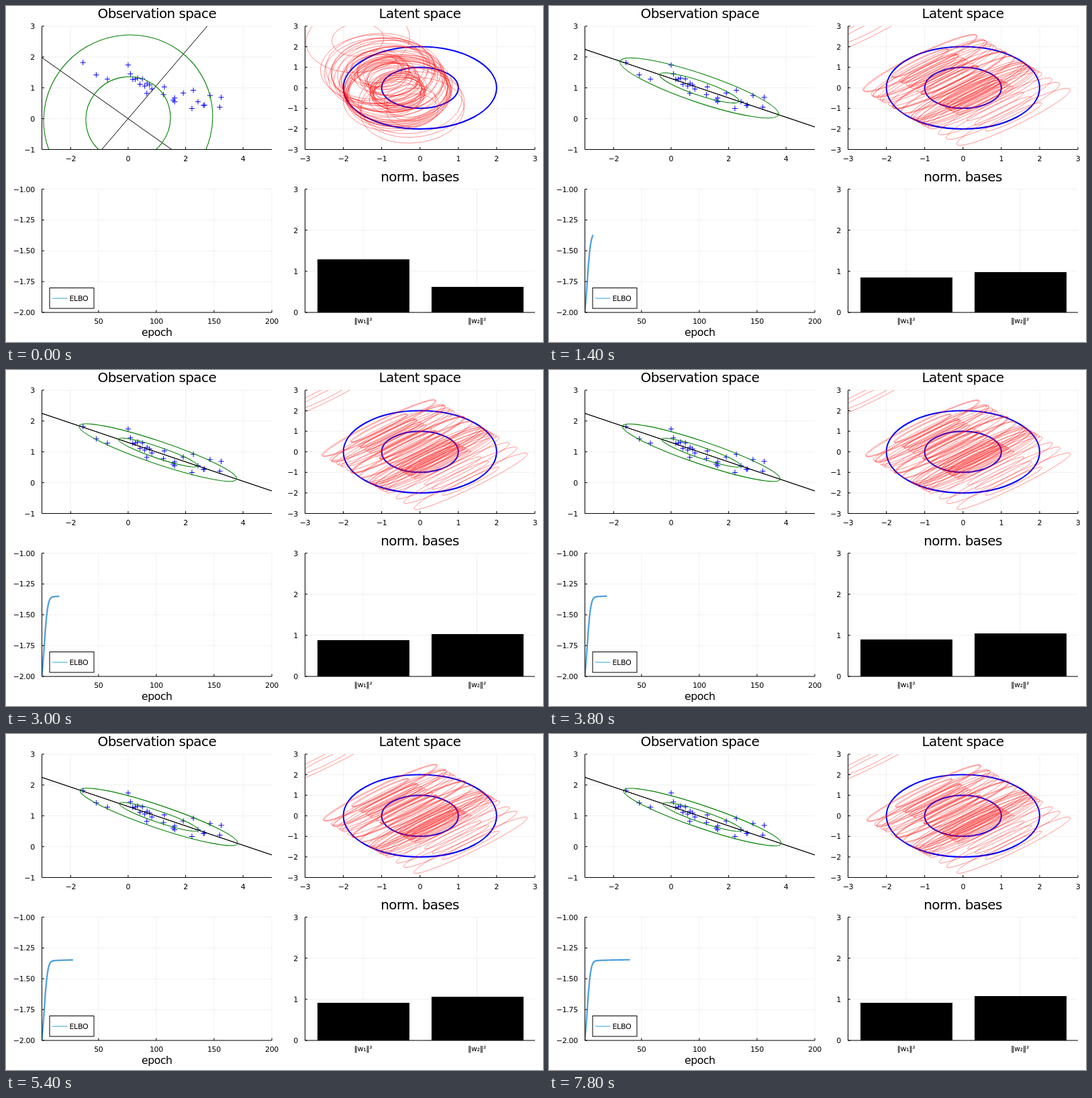
An HTML page with a canvas for the animation above (8 s loop, 800 by 500 pixels).

```html
<!DOCTYPE html>
<html lang="en">
<head>
<meta charset="utf-8">
<title>Latent variable fit</title>
<style>
html, body { margin: 0; width: 100%; height: 100%; overflow: hidden; background: #fff; }
canvas { display: block; width: 800px; height: 500px; }
</style>
</head>
<body>
<canvas id="stage" width="800" height="500"></canvas>
<script>
const ctx = document.getElementById('stage').getContext('2d');
const STEP = 200, COUNT = 40;
const FONT = '"DejaVu Sans", Verdana, sans-serif';
const TITLE = 20, NAME = 15.7, TICK = 11;

// Maps data ranges to a pixel box.
function panel(left, top, x0, x1, y0, y1) {
  const w = 342.5, h = 183.5;
  return {
    left, top, w, h,
    sx: w / (x1 - x0), sy: h / (y1 - y0),
    x: v => left + (v - x0) / (x1 - x0) * w,
    y: v => top + h - (v - y0) / (y1 - y0) * h
  };
}
const obs = panel(53.5, 30, -3, 5, -1, 3);
const lat = panel(445.5, 30, -3, 3, -3, 3);
const elbo = panel(53.5, 272.5, 1, 200, -2, -1);
const norm = panel(445.5, 272.5, 0, 1, 0, 3);

// Scattered observations (the last lies outside the view) and one dense run.
const data = [
  [-1.57, 1.82], [-1.11, 1.42], [-.72, 1.28], [0, 1.74], [.65, .82],
  [1.23, .78], [1.26, 1.03], [1.57, .6], [1.62, .55], [1.62, .67],
  [1.92, .83], [2.22, .33], [2.27, .92], [2.43, .55], [2.62, .43],
  [2.66, .44], [2.85, .75], [3.19, .37], [3.24, .69], [6, -.55]
];
for (let i = 0; i < 10; i++) {
  data.push([.08 + .083 * i, 1.36 - .036 * i + .11 * Math.sin(2.6 * i + 1)]);
}

const AXIS = [.954, -.3];
const mix = (a, b, f) => a.map((v, i) => v + (b[i] - v) * f);
const dot = (a, b) => a[0] * b[0] + a[1] * b[1];
const scale = (a, k) => a.map(v => v * k);

// Probabilistic PCA: both bases collapse onto the main axis while the noise
// shrinks; the slow remainder decays with the root of the epoch.
function stateAt(epoch) {
  const settled = 1 - Math.exp(-2 * (epoch - 1));
  const slow = 1 / Math.sqrt(epoch);
  const noise = .034 + 1.03 * Math.exp(-.56 * (epoch - 1));
  const w1 = mix([-.764, -.833], scale(AXIS, -Math.sqrt(.975 - .38 * slow)), settled);
  const w2 = mix([.65, -.429], scale(AXIS, Math.sqrt(1.164 - .5585 * slow)), settled);
  const mean = mix([0, 0], [1.172 - .545 * slow, .935 + .17 * slow], settled);
  const [ux, uy] = AXIS;
  const fitted = [2.03 * ux * ux + noise, 2.03 * uy * uy + noise, 2.03 * ux * uy];
  const cov = mix([2.165, 1.845, .05], fitted, settled);

  // Inverse of W'W + noise, and the latent posterior that follows from it.
  const a = dot(w1, w1) + noise, b = dot(w2, w2) + noise, c = dot(w1, w2);
  const det = a * b - c * c;
  const spread = [b, a, -c].map(v => v * noise / det);
  const latent = x => {
    const d = [x[0] - mean[0], x[1] - mean[1]];
    const p = dot(w1, d), q = dot(w2, d);
    return [(b * p - c * q) / det, (a * q - c * p) / det];
  };
  return { bases: [w1, w2], mean, cov, spread, latent };
}

const bound = e => -1.338 - .05 / Math.sqrt(e) - .641 * Math.exp(-e * e / 17.5);

function line(x1, y1, x2, y2, color, width = 1) {
  ctx.strokeStyle = color;
  ctx.lineWidth = width;
  ctx.beginPath();
  ctx.moveTo(x1, y1);
  ctx.lineTo(x2, y2);
  ctx.stroke();
}

function text(str, x, y, size, align = 'center') {
  ctx.font = size + 'px ' + FONT;
  ctx.letterSpacing = -.03 * size + 'px';
  ctx.textAlign = align;
  ctx.fillStyle = '#000';
  ctx.fillText(str, x, y);
}

// Contour of a 2D Gaussian, r standard deviations out.
function contour(p, [cx, cy], [vx, vy, c], r, color, width) {
  const mid = (vx + vy) / 2, d = Math.hypot((vx - vy) / 2, c);
  const turn = Math.atan2(2 * c, vx - vy) / 2;
  ctx.save();
  ctx.translate(p.x(cx), p.y(cy));
  ctx.scale(p.sx, -p.sy);
  ctx.beginPath();
  ctx.ellipse(0, 0, r * Math.sqrt(mid + d), r * Math.sqrt(Math.max(mid - d, 0)), turn, 0, Math.PI * 2);
  ctx.restore();
  ctx.strokeStyle = color;
  ctx.lineWidth = width;
  ctx.stroke();
}

function clipped(p, draw) {
  ctx.save();
  ctx.beginPath();
  ctx.rect(p.left, p.top, p.w, p.h);
  ctx.clip();
  draw();
  ctx.restore();
}

const label = (v, digits) => (v < 0 ? '−' : '') + Math.abs(v).toFixed(digits);

function range(from, to, step = 1) {
  const list = [];
  for (let v = from; v <= to; v += step) list.push(v);
  return list;
}

function grid(p, xs, ys) {
  for (const v of xs) line(p.x(v), p.top, p.x(v), p.top + p.h, '#f0f0f0');
  for (const v of ys) line(p.left, p.y(v), p.left + p.w, p.y(v), '#f0f0f0');
}

function axes(p, xs, ys, digits, names) {
  const bottom = p.top + p.h;
  line(p.left, p.top, p.left, bottom, '#000');
  line(p.left, bottom, p.left + p.w, bottom, '#000');
  xs.forEach((v, i) => {
    line(p.x(v), bottom, p.x(v), bottom - 3.5, '#000');
    text(names ? names[i] : label(v, 0), p.x(v), bottom + (names ? 16 : 17.2), TICK);
  });
  for (const v of ys) {
    line(p.left, p.y(v), p.left + 3.5, p.y(v), '#000');
    text(label(v, digits), p.left - 10.7, p.y(v) + 4, TICK, 'right');
  }
}

function drawObservations({ bases, mean, cov }) {
  const xs = range(-2, 4, 2), ys = range(-1, 3);
  grid(obs, xs, ys);
  clipped(obs, () => {
    for (const [vx, vy] of data) {
      const x = obs.x(vx), y = obs.y(vy);
      line(x - 4, y, x + 4, y, '#00f');
      line(x, y - 4, x, y + 4, '#00f');
    }
    const [mx, my] = mean;
    for (const [wx, wy] of bases) {
      const k = 15 / Math.hypot(wx, wy);
      line(obs.x(mx - k * wx), obs.y(my - k * wy), obs.x(mx + k * wx), obs.y(my + k * wy), '#000');
    }
    for (const r of [1, 2]) contour(obs, mean, cov, r, '#008000', 1.1);
  });
  axes(obs, xs, ys, 0);
  text('Observation space', 224.8, 17.5, TITLE);
}

function drawLatent({ spread, latent }) {
  const ticks = range(-3, 3);
  grid(lat, ticks, ticks);
  clipped(lat, () => {
    for (const r of [1, 2]) contour(lat, [0, 0], [1, 1, 0], r, '#00f', 2);
    for (const x of data) {
      for (const r of [1, 2]) contour(lat, latent(x), spread, r, 'rgba(255,0,0,.42)', 1);
    }
  });
  axes(lat, ticks, ticks, 0);
  text('Latent space', 616.5, 17.5, TITLE);
}

function drawBound(epoch) {
  const xs = range(50, 200, 50), ys = range(-2, -1, .25);
  grid(elbo, xs, ys);
  clipped(elbo, () => {
    ctx.beginPath();
    for (let e = 1; e <= epoch; e++) ctx.lineTo(elbo.x(e), elbo.y(bound(e)));
    ctx.lineJoin = 'round';
    ctx.strokeStyle = '#8fb2e8';
    ctx.lineWidth = 2.6;
    ctx.stroke();
    ctx.strokeStyle = '#2f9fd8';
    ctx.lineWidth = 1.2;
    ctx.stroke();
  });
  axes(elbo, xs, ys, 2);
  text('epoch', 224.8, 491, NAME);
  ctx.fillStyle = '#fff';
  ctx.fillRect(65, 419.5, 66, 30.5);
  ctx.strokeStyle = '#000';
  ctx.lineWidth = 1;
  ctx.strokeRect(65, 419.5, 66, 30.5);
  line(69, 435, 91.5, 435, '#2f9fd8');
  text('ELBO', 94.5, 439, TICK, 'left');
}

function drawNorms({ bases }) {
  const xs = [.2525, .7475], ys = range(0, 3);
  grid(norm, xs, ys);
  axes(norm, xs, ys, 0, ['‖w₁‖²', '‖w₂‖²']);
  bases.forEach((w, i) => {
    const top = Math.round(norm.y(dot(w, w)) - .5);
    ctx.fillStyle = '#000';
    ctx.fillRect(Math.round(norm.x(xs[i]) - 68), top, 137, norm.y(0) - top);
  });
  text('norm. bases', 616.5, 260.5, TITLE);
}

const start = performance.now();
function frame() {
  const elapsed = Math.max(0, performance.now() - start);
  const epoch = Math.floor(elapsed / STEP) % COUNT + 1;
  const state = stateAt(epoch);
  ctx.fillStyle = '#fff';
  ctx.fillRect(0, 0, 800, 500);
  drawObservations(state);
  drawLatent(state);
  drawBound(epoch);
  drawNorms(state);
  requestAnimationFrame(frame);
}
frame();
</script>
</body>
</html>
```
